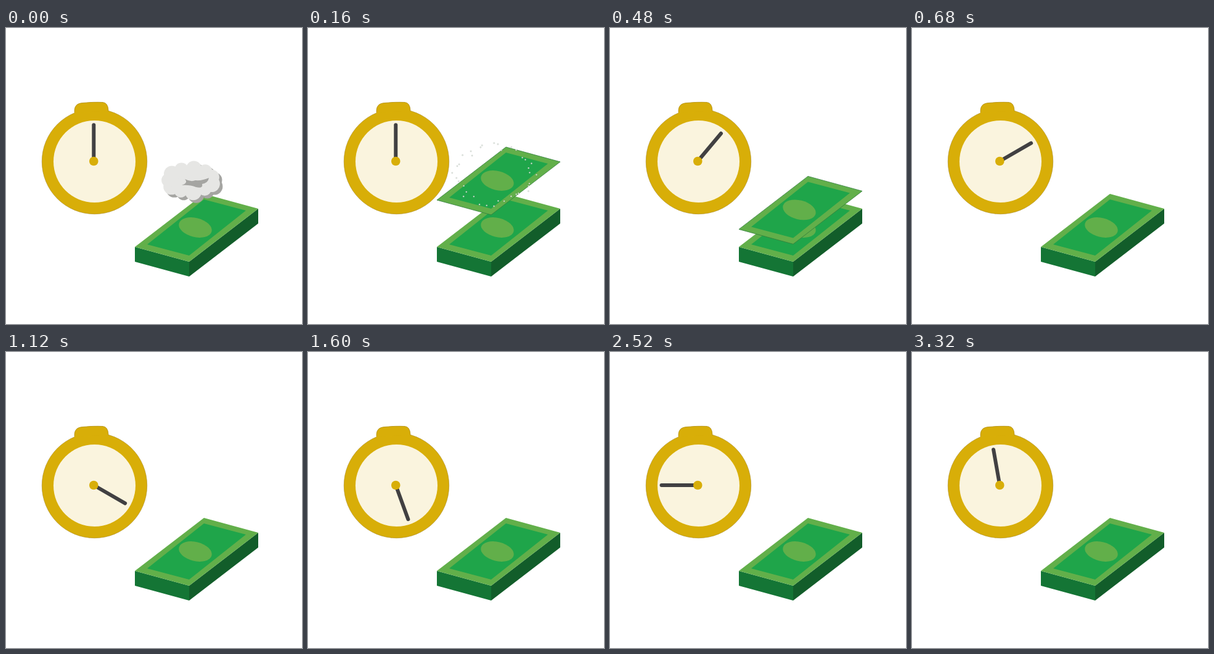
Recreate the animation shown at these times as an HTML page. Size 480 by 480 pixels, loop 3.36 s.

```html
<!DOCTYPE html>
<html lang="en">
<head>
<meta charset="utf-8">
<title>Time and money</title>
<style>
  html, body { margin: 0; width: 100%; height: 100%; overflow: hidden; background: #fff; }
  svg { display: block; width: 100%; height: 100%; }
</style>
</head>
<body>
<svg viewBox="0 0 480 480">
  <defs>
    <g id="bill">
      <path fill="#62af4a" d="M321 269L409 293L297 379L209 355Z"/>
      <path fill="#1fa54a" d="M321 278L389 296L297 369L229 351Z"/>
      <ellipse fill="#62af4a" rx="27.3" ry="15.5" transform="translate(307 323.5) rotate(14)"/>
    </g>
  </defs>

  <g fill="#d8ae08">
    <g stroke="#a5851a" stroke-width=".6">
      <circle cx="143.5" cy="216.5" r="85.2"/>
      <path d="M111 138V133Q112 122 124 121.5Q143 119.7 157 120.5Q165 121 166 133V138L160 150H116Z" stroke="none"/>
      <path d="M111 137V133Q112 122 124 121.5Q143 119.7 157 120.5Q165 121 166 133V135"/>
    </g>
    <circle cx="143.5" cy="216.5" r="66.5" fill="#faf4de"/>
    <path id="hand" d="M142.3 216V157.3" stroke="#414042" stroke-width="6" stroke-linecap="round"/>
    <circle cx="142.3" cy="216" r="7.3"/>
  </g>

  <path fill="#147535" d="M209 355L297 379V403L209 379Z"/>
  <path fill="#125d2a" d="M297 379L409 293V317L297 403Z"/>
  <use href="#bill"/>
  <g id="falling">
    <use href="#bill"/>
    <path fill="none" stroke="#2f7d3b" stroke-width=".8" d="M321 269L409 293L297 379L209 355Z"/>
  </g>
  <g id="puff"></g>
</svg>

<script>
const LOOP = 3360, STEP = 40, TICK_STEPS = 7;
const FALL_START = 200, FALL_END = 680, DROP = 76;
const PUFF_STEPS = 5, LOBES = 11, SPECKS = 36;
const LIGHT = '#e6e6e4', SHADE = '#a5a5a2';
const $ = id => document.getElementById(id);

function seededRandom(seed) {
  return () => (seed = seed * 16807 % 2147483647) / 2147483647;
}

const circle = (x, y, r, fill) => `<circle cx="${x}" cy="${y}" r="${r}" fill="${fill}"/>`;

// A ring of lobes that spreads and thins as the smoke clears
function smokeRing(step, shift, fill) {
  const spread = 1 + 0.09 * step;
  const shrink = 1 - 0.27 * step;
  let out = '';
  for (let i = 0; i < LOBES; i++) {
    const a = 2 * Math.PI * i / LOBES + 0.3;
    const x = 299 + 36 * spread * Math.cos(a) + shift;
    const y = 247 + 19 * spread * Math.sin(a) + shift;
    out += circle(x, y, (12 + 1.5 * Math.cos(3 * i)) * shrink, fill);
  }
  return out;
}

function specks(step) {
  const random = seededRandom(29);
  const left = PUFF_STEPS - step;
  const spread = 1 - 0.06 * (left - 1);
  let out = '';
  for (let i = 0; i < SPECKS; i++) {
    const a = 2 * Math.PI * (i + random()) / SPECKS;
    const reach = spread * (0.85 + 0.25 * random());
    out += circle(303 + 64 * reach * Math.cos(a), 238 + 47 * reach * Math.sin(a), 1.1 * left, '#e9f3e9');
  }
  return `<g stroke="#999" stroke-width=".3">${out}</g>`;
}

function puffMarkup(step) {
  if (step >= PUFF_STEPS) return '';
  let out = '';
  if (step < 4) {
    out += smokeRing(step, 4.5, SHADE);
    if (step === 0) out += `<ellipse cx="299" cy="247" rx="36" ry="18" fill="${LIGHT}"/>`;
    out += smokeRing(step, 0, LIGHT);
  }
  if (step === 0) {
    out += `<path fill="${SHADE}" d="M285 255Q296 251 290 245Q300 250 307 247Q318 248 329 243Q328 251 318 253Q320 261 308 258Q298 254 285 255Z"/>`;
  }
  return step > 1 ? out + specks(step) : out;
}

function render(time) {
  const step = Math.floor((time % LOOP) / STEP);

  const angle = 30 * Math.floor(step / TICK_STEPS) + 10 * Math.max(0, step % TICK_STEPS - 4);
  $('hand').setAttribute('transform', `rotate(${angle} 142.3 216)`);

  const u = Math.min(1, Math.max(0, (step * STEP - FALL_START) / (FALL_END - FALL_START)));
  const lift = DROP * (1 - u * u * (3 - 2 * u));
  $('falling').setAttribute('transform', `translate(0 ${-lift})`);
  $('falling').setAttribute('visibility', step > 0 && u < 1 ? 'visible' : 'hidden');

  $('puff').innerHTML = puffMarkup(step);
}

const start = performance.now();
function frame() {
  render(performance.now() - start);
  requestAnimationFrame(frame);
}
frame();
</script>
</body>
</html>
```
